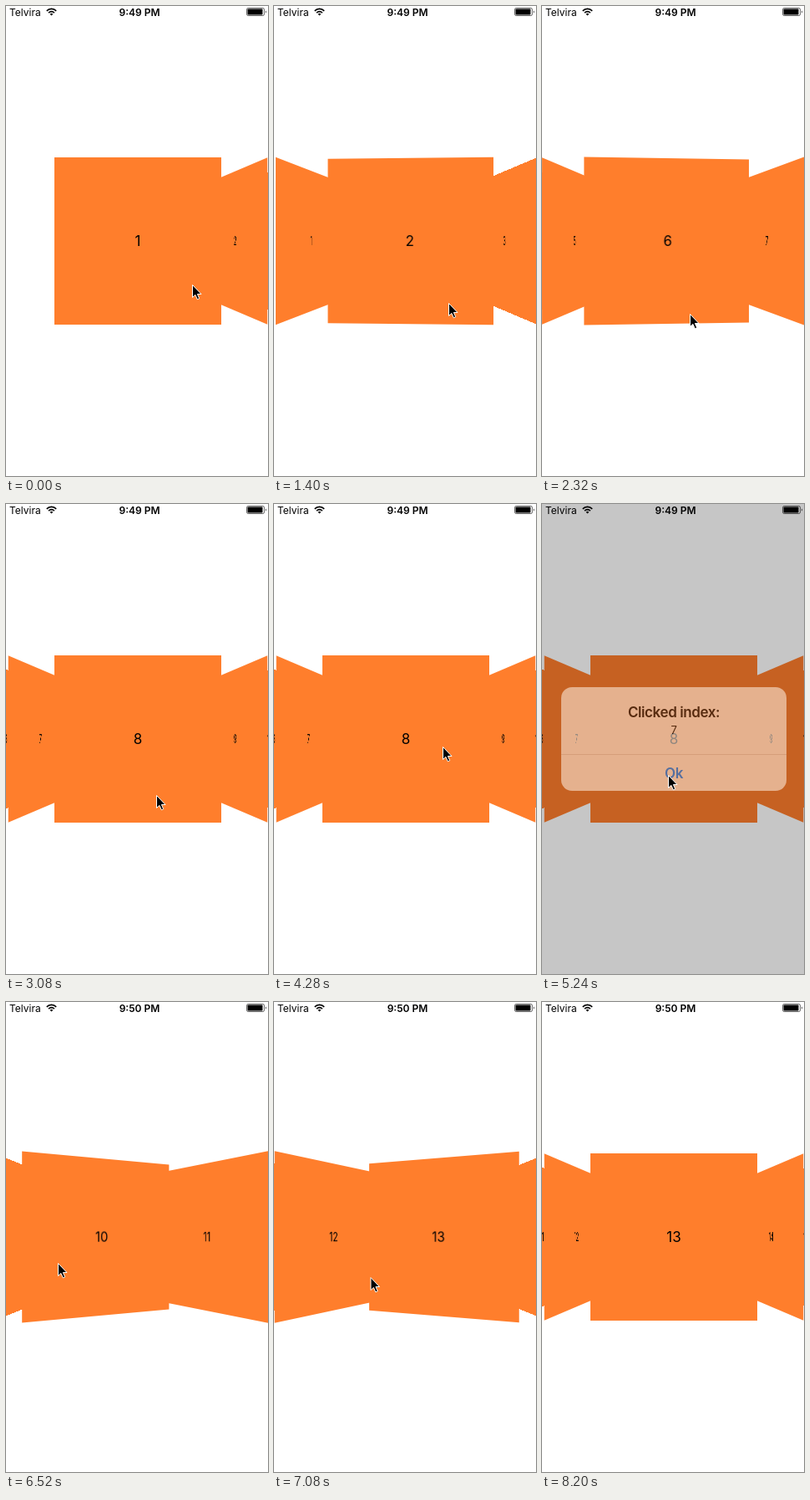
An HTML page that plays this animation: 314 by 562 pixels, repeating every 9.6 s.

```html
<!DOCTYPE html>
<html lang="en">
<head>
<meta charset="utf-8">
<title>Cover flow carousel</title>
<style>
  html, body { margin: 0; width: 100%; height: 100%; overflow: hidden; background: #fff; }
  body { position: relative; font-family: Inter, Roboto, sans-serif; color: #000; }
  body > *, .card { position: absolute; }
  #stage { inset: 0; overflow: hidden; isolation: isolate; }
  .card {
    left: 58px; top: 181px; width: 200px; height: 200px;
    background: #ff7e2c; font-size: 17px; line-height: 200px; text-align: center;
  }
  #status { left: 0; top: 0; }
  #dim { inset: 0; background: #000; }
  #alert {
    left: 23px; top: 219px; width: 270px; height: 124px; border-radius: 13px;
    background: #fdefe3; text-align: center; font-size: 17px; letter-spacing: -.4px;
  }
  #alert div { position: absolute; left: 0; width: 100%; line-height: 20px; }
  #alert .title { top: 20px; font-weight: 600; }
  #alert .message { top: 41px; font-size: 13px; }
  #alert .ok { top: 80px; padding: 12px 0; border-top: 1px solid #e0cdbf; color: #007aff; font-weight: 600; }
  #cursor { left: 0; top: 0; overflow: visible; }
</style>
</head>
<body>
<div id="stage"></div>

<svg id="status" width="314" height="20" font-size="12">
  <text x="4" y="11.5">Telvira</text>
  <g transform="translate(54.5 11.5)" fill="none" stroke="#000" stroke-width="1.7">
    <path d="M-5.7-5.7A8 8 0 0 1 5.7-5.7M-3.4-3.4A4.8 4.8 0 0 1 3.4-3.4"/>
    <path d="M0 0L-1.8-1.8A2.5 2.5 0 0 1 1.8-1.8Z" fill="#000" stroke="none"/>
  </g>
  <text id="clock" x="160" y="11.5" text-anchor="middle" font-weight="600"></text>
  <rect x="288.5" y="2.5" width="21" height="9" rx="1.8" fill="none" stroke="#000" stroke-opacity=".6"/>
  <rect x="289.5" y="3.5" width="18" height="7" rx=".8"/>
  <path d="M311 5.2q1.8 1.8 0 3.6z"/>
</svg>

<div id="dim"></div>
<div id="alert">
  <div class="title">Clicked index:</div>
  <div class="message">7</div>
  <div class="ok">Ok</div>
</div>

<svg id="cursor" width="12" height="19">
  <path d="M.5 .5V15.5L3.9 12.4L6.3 17.8L8.7 16.7L6.4 11.5H11Z" stroke="#fff" stroke-linejoin="round"/>
</svg>

<script>
const LOOP = 9600, CARD = 200, TILT = 0.9, SPACING = 0.25;
const byId = id => document.getElementById(id);
const clamp = (v, lo, hi) => Math.max(lo, Math.min(hi, v));
const progress = (t, start, end) => clamp((t - start) / (end - start), 0, 1);
const smooth = p => p * p * (3 - 2 * p);
const decelerate = p => 1 - (1 - p) ** 2;

const cards = Array.from({ length: 20 }, (_, i) => {
  const card = document.createElement('div');
  card.className = 'card';
  card.textContent = i + 1;
  return byId('stage').appendChild(card);
});

// Drags and flings: start, end, from index, to index, easing
const moves = [
  [120, 960, 0, 0.72, p => p],
  [960, 1640, 0.72, 1, decelerate],
  [2080, 2640, 1, 7, decelerate],
  [5950, 6540, 7, 9.45, p => p ** 1.54],
  [6540, 7360, 9.45, 12, decelerate]
];

// Pointer stops: time, x, y
const pointer = [
  [120, 223, 333], [960, 150, 342], [1400, 209, 355], [2040, 230, 352],
  [2200, 177, 368], [2320, 177, 368], [3080, 180, 348], [4040, 202, 290],
  [4440, 202, 290], [5060, 151, 324], [5240, 151, 324], [5950, 280, 322],
  [6520, 62, 312], [7500, 150, 340], [7840, 150, 340], [8160, 165, 300]
];

function scrollAt(t) {
  const [start, end, from, to, ease] = moves.findLast(m => t >= m[0]) || moves[0];
  return from + (to - from) * ease(progress(t, start, end));
}

function pointerAt(t) {
  const next = pointer.findIndex(stop => stop[0] > t);
  if (next < 1) return pointer.at(next).slice(1);
  const [t0, x0, y0] = pointer[next - 1], [t1, x1, y1] = pointer[next];
  const p = smooth(progress(t, t0, t1));
  return [x0 + (x1 - x0) * p, y0 + (y1 - y0) * p];
}

function placeCard(card, offset) {
  const side = clamp(offset, -1, 1);
  const x = (side * 0.5 * TILT + offset * SPACING) * CARD;
  const z = -Math.abs(side) * CARD / 2;
  card.style.display = Math.abs(offset) < 5 ? '' : 'none';
  card.style.zIndex = 1000 - Math.round(Math.abs(offset) * 100);
  card.style.transform =
    `perspective(500px) translate3d(${x}px,0,${z}px) rotateY(${-side * 90 * TILT}deg)`;
}

function render(t) {
  const scroll = scrollAt(t);
  cards.forEach((card, i) => placeCard(card, i - scroll));
  byId('clock').textContent = t < 5600 ? '9:49 PM' : '9:50 PM';

  const shown = smooth(progress(t, 4400, 4720));
  const opacity = shown * (1 - smooth(progress(t, 5115, 5390)));
  byId('dim').style.opacity = 0.4 * opacity;
  byId('alert').style.opacity = opacity;
  byId('alert').style.transform = `scale(${1.2 - 0.2 * shown})`;

  const [x, y] = pointerAt(t);
  byId('cursor').style.transform = `translate(${x}px,${y}px)`;
  byId('cursor').style.visibility = t < 8180 ? 'visible' : 'hidden';
}

const began = performance.now();
function tick() {
  render((performance.now() - began) % LOOP);
  requestAnimationFrame(tick);
}
tick();
</script>
</body>
</html>
```
